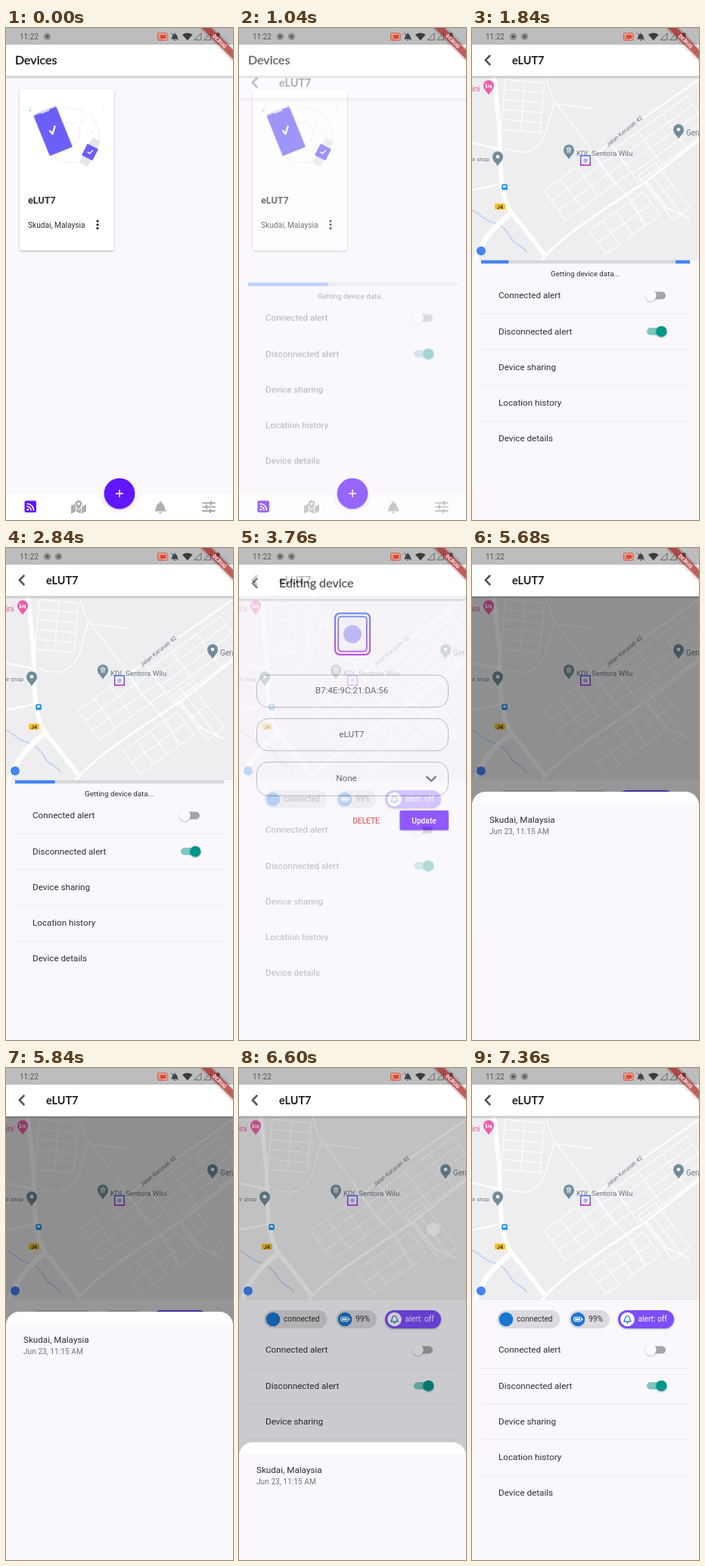
These frames come from a looping animation (300 px wide and 650 px high, 7400 ms). An HTML page:

```html
<!DOCTYPE html>
<html lang="en">
<head>
<meta charset="utf-8">
<style>
html, body { margin: 0; width: 100%; height: 100%; overflow: hidden; background: #faf8fd; }
svg { display: block; width: 300px; height: 650px; }
text { font: 11.68px Roboto, sans-serif; fill: #302f32; }
.s { font-size: 10.2px; }
.title { font: 500 16px Lato, sans-serif; fill: #1d1c20; stroke: #1d1c20; stroke-width: .3px; }
.name { font-size: 14.4px; font-weight: 700; stroke-width: 0; }
.mid { text-anchor: middle; }
.map text { fill: #66747e; stroke: #f2f1f4; stroke-width: 1.6px; paint-order: stroke; }
.road { fill: none; stroke: #fdfdfd; stroke-linejoin: round; }
.line { fill: none; stroke-linecap: round; stroke-linejoin: round; }
</style>
</head>
<body>
<svg id="stage" viewBox="0 0 300 650"></svg>
<script>
const LOOP = 7400, INK = '#6217ff', PAPER = '#faf8fd';
const NAME = 'eLUT7', PLACE = 'Skudai, Malaysia';

// Markup helpers
const text = (x, y, s, cls = '', more = '') => `<text x="${x}" y="${y}" class="${cls}" ${more}>${s}</text>`;
const rect = (x, y, w, h, fill, r = 0, more = '') =>
  `<rect x="${x}" y="${y}" width="${w}" height="${h}" rx="${r}" fill="${fill}" ${more}/>`;
const dot = (x, y, r, fill, more = '') => `<circle cx="${x}" cy="${y}" r="${r}" fill="${fill}" ${more}/>`;
const line = (d, color, w = 1, more = '') =>
  `<path class="line" d="${d}" stroke="${color}" stroke-width="${w}" ${more}/>`;
const fill = (d, color, more = '') => `<path d="${d}" fill="${color}" ${more}/>`;
const at = (x, y, body, more = '') => `<g transform="translate(${x} ${y}) ${more}">${body}</g>`;
const group = (id, body, more = '') => `<g id="${id}" ${more}>${body}</g>`;

const bell = (x, y, k, color) => at(x, y,
  fill('M-8 5.5C-5 3-6-6 0-6S5 3 8 5.5ZM-2 6.5H2A2 2 0 0 1-2 6.5ZM-1-8H1V-5H-1Z', color), `scale(${k})`);

const bar = (title, cls, x) => rect(0, 0, 300, 63.5, '#fff') + rect(0, 63.5, 300, 4, 'url(#shade)') +
  (x > 20 ? line('M23.5 36.8L17.8 42.5L23.5 48.2', '#5a595c', 2.7) : '') + text(x, 48, title, 'title ' + cls);

const illustration =
  `<g fill="none" stroke="#e6e4f3" stroke-width=".8">
    <circle cx="83" cy="139" r="15"/><path d="M78 107A36 36 0 0 1 122 151M117 158A36 36 0 0 1 62 170"/>
    <circle cx="101" cy="124" r="1.3"/><circle cx="60" cy="171" r="1.3"/></g>` +
  dot(32, 109, 1.4, '#8fe0d0') + dot(34, 105, .8, '#8fe0d0') +
  dot(129, 104, 1, '#cfe9e6') + dot(114, 138, 1, '#cfe9e6') +
  at(62, 136, rect(-17, -30, 34, 60, '#d9d7ee', 3) + rect(-16, -28, 32, 57, '#6c5ff8', 1.5) +
    rect(-6, -29.5, 12, 3, '#d9d7ee', 1), 'rotate(-22)') +
  line('M58 136L61.5 140L64.5 130', '#fff', 2.4) +
  at(111, 164, rect(-6, -19, 12, 38, '#e6e6ea', 2) + rect(-8, -8.5, 16, 17, '#6c5ff8', 1), 'rotate(27)') +
  line('M108 164L110.3 166L114.5 162', '#fff', 1.5);

const navIcons =
  rect(24.5, 624.5, 15.5, 15.5, INK, 2) +
  line('M28 628.5A8.5 8.5 0 0 1 36.5 637M28 632A5 5 0 0 1 33 637', '#fff', 1.6) + dot(28.8, 636.2, 1.4, '#fff') +
  fill('M86 631L92 628V639L86 641.5ZM93 629L99 633V641.5L93 639ZM100 633L106 629V638.5L100 641.5Z', '#b0afb2') +
  fill('M96 637C92 632 91 630 91 628.5A5 5 0 0 1 101 628.5C101 630 100 632 96 637Z', '#b0afb2', `stroke="#fff"`) +
  dot(96, 628.5, 1.7, '#fff') + bell(204, 633, 1, '#b0afb2') +
  line('M260 627.5H276M260 632.7H276M260 638H276', '#a9a8ab', 1.8) +
  line('M271 625.5V629.5M265 630.7V634.7M270 636V640', '#a9a8ab', 2.2);

const devices = rect(0, 0, 300, 650, PAPER) + bar('Devices', '', 12) +
  rect(18, 81, 125, 213, '#fff', 2.5, 'filter="url(#soft)"') + illustration +
  text(29, 232, NAME, '', 'style="font-size:12.6px;font-weight:700"') + text(29, 263.5, PLACE, 's') +
  [255, 259.8, 264.6].map(y => dot(121, y, 1.6, '#222')).join('') +
  fill('M0 614.5H112C122 614.5 123 616 125 622A26 26 0 0 0 175 622C177 616 178 614.5 188 614.5H300V650H0Z', '#fff', 'filter="url(#soft)"') +
  navIcons + dot(150, 615, 20.3, INK, 'filter="url(#soft)"') + line('M145.5 615H154.5M150 610.5V619.5', '#fff', 1.5);

// Street blocks: rows of lines with cross streets, turned as one
const block = (x, y, turn, w, h, nx, ny) => {
  let d = '';
  for (let i = 0; i <= ny; i++) d += `M0 ${h * i / ny}H${w}`;
  for (let i = 0; i <= nx; i++) d += `M${w * i / nx} 0V${h}`;
  return `<path class="road" stroke-width="1.3" d="${d}" transform="translate(${x} ${y}) rotate(${turn})"/>`;
};
const road = (d, w) => `<path class="road" d="${d}" stroke-width="${w}"/>`;
const pin = (x, y, color) => at(x, y,
  fill('M0 10.5C-2 6-7 3.5-7-2A7 7 0 0 1 7-2C7 3.5 2 6 0 10.5Z', color));

const streets = rect(0, 64, 300, 243, '#eeedef') +
  line('M0 241C12 246 16 254 28 257S46 268 52 278S66 286 72 296', '#bcd3f2', 1.6) +
  block(44, 68, 5, 52, 66, 2, 5) + block(95, 215, -36, 108, 48, 4, 3) + block(155, 268, -36, 88, 38, 4, 2) +
  block(188, 160, -36, 118, 54, 3, 4) + block(242, 178, 52, 75, 28, 2, 2) +
  road('M97 64L106 92L150 150L178 190L214 232L228 262', 1.5) + road('M45 160C70 168 84 166 97 140L108 100L160 106', 1.5) +
  road('M150 176L228 118L300 68', 2.4) + road('M92 307C112 282 140 262 230 203L300 148', 3.4) +
  road('M230 203L258 238L288 252', 2.4) + road('M29 64L36 130L38 190C40 225 48 242 62 256L96 300', 6) +
  road('M50 246C30 262 14 278 4 307', 7) + road('M0 152L38 160M0 214L40 206', 2.4);

const labels =
  pin(22, 78, '#ec5fa8') + line('M18.5 73.5V79.5M18.5 78H25.5V79.5M21 76H25.5V78', '#fff', 1.1) +
  text(0, 83.5, 'ini', 's', 'style="fill:#d8569c"') +
  [[34, 172], [128, 163], [273, 136]].map(([x, y]) => pin(x, y, '#718d9a')).join('') +
  dot(34, 170, 2.3, '#fff') + dot(273, 134, 2.3, '#fff') +
  line('M125 159.5L128 157L131 159.5ZM125.5 164H130.5M126 160.5V163M128 160.5V163M130 160.5V163', '#fff', .9) +
  text(0, 175.5, 'ir shop', '', 'style="font-size:7.6px"') +
  text(138, 169, 'KDL Sentora Wilu', '', 'style="font-size:9.7px"') +
  text(283, 141.5, 'Gera', '', 'style="font-size:10px"') +
  at(180, 157, text(0, 0, 'Jalan Kerunati 42', '', 'style="font-size:7.6px"'), 'rotate(-39)') +
  rect(39.3, 206.3, 7.6, 7.6, '#1e96ee', 1.5) + rect(41.2, 208, 3.8, 2.8, '#fff', .5) +
  rect(30, 232, 14, 8, '#fbc02d', 2) + text(37, 238.6, 'J4', 'mid', 'style="font-size:7px;font-weight:700;stroke:none;fill:#333"') +
  rect(143.7, 168.7, 12.6, 12.6, '#f4f2fb', 0, 'stroke="url(#tag)" stroke-width="1.4"') + dot(150, 175, 2.8, '#a9b2fa') +
  dot(12, 294.5, 6, '#4285f4');

const ROW = 47.3;
const row = (s, i) => text(35, 357.2 + ROW * i, s) +
  (i < 4 ? rect(12, 377 + ROW * i, 276, .8, '#e9e7ec') : '');
const rows = ['Connected alert', 'Disconnected alert', 'Device sharing', 'Location history', 'Device details'].map(row).join('') +
  rect(235, 348.6, 21, 9.8, '#a7a6a9', 4.9) + dot(236.5, 353.5, 7.2, '#fcfbfd', 'filter="url(#soft)"') +
  rect(231, 396, 21, 9.8, '#7cc8c1', 4.9) + dot(250.3, 400.9, 7.2, '#009688', 'filter="url(#soft)"');

const chips =
  rect(33, 320, 83.5, 24, '#dcdade', 12) + dot(45, 332, 9.3, '#1976d2') + text(59, 335.2, 'connected', 's') +
  rect(128, 320, 54, 24, '#dcdade', 12) + dot(140, 332, 9.3, '#1976d2') + text(154, 335.2, '99%', 's') +
  rect(134.5, 329.2, 10, 5.6, 'none', 1, 'stroke="#fff"') + rect(136, 330.6, 7, 2.8, '#fff') + rect(145, 330.7, 1.3, 2.6, '#fff') +
  rect(193, 320, 74, 24, '#7c4dff', 12, 'filter="url(#soft)"') + dot(205.5, 332, 9.3, '#fff') +
  line('M200.8 334.8C203 332.5 201.5 327.5 205.5 327.5S208 332.5 210.2 334.8ZM204.5 336.6H206.5', '#1976d2', 1.2) +
  text(219.5, 335.2, 'alert: off', 's', 'style="fill:#fff"');

const loading = rect(12, 306.8, 276, 4.4, '#d8d6db') + rect(12, 306.8, 0, 4.4, '#4285f4', 0, 'id="seg1"') +
  rect(12, 306.8, 0, 4.4, '#4285f4', 0, 'id="seg2"') +
  text(149.7, 328, 'Getting device data...', 'mid', 'style="font-size:9.75px"');

const detail = rect(0, 0, 300, 650, PAPER) + group('streets', streets) + group('labels', labels, 'class="map"') +
  group('rows', rows) + group('loading', loading) + group('chips', chips) +
  rect(0, 64, 300, 586, '#000', 0, 'id="dim"') +
  group('sheet', fill('M0 328V18A18 18 0 0 1 18 0H282A18 18 0 0 1 300 18V328Z', '#fff') + rect(0, 15, 300, 320, PAPER) +
    text(23, 41, PLACE) + text(23, 56, 'Jun 23, 11:15 AM', 's', 'style="fill:#757478"')) +
  bar(NAME, 'name', 53);

const field = (y, h, s, x) => rect(23.5, y, 253, h, 'none', 15, 'stroke="#9a999c" stroke-width=".9"') +
  text(x, y + h / 2 + 3, s, 'mid');
const edit = rect(0, 0, 300, 650, PAPER) + bar('Editing device', '', 53) +
  rect(127, 82.5, 46, 54.5, 'none', 6, 'stroke="url(#tag)" stroke-width="2.2"') +
  rect(131.2, 86.7, 37.6, 46, '#f5f3fd', 4, 'stroke="url(#tag)" stroke-width="1.8"') + dot(150, 110, 12, '#a9a4f6') +
  field(164, 42.5, 'B7:4E:9C:21:DA:56', 149) + field(221.5, 42.5, NAME, 149) + field(279, 44.5, 'None', 142) +
  line('M248.3 298.6L254 304L259.7 298.6', '#59585b', 2.5) +
  text(168, 359.8, 'DELETE', 's mid', 'style="fill:#d32f2f;font-weight:500"') +
  rect(212.5, 343, 64.5, 26, INK, 2, 'filter="url(#soft)"') +
  text(244.5, 359.8, 'Update', 's mid', 'style="fill:#fff;font-weight:500"');

const ring = x => dot(x, 11.2, 4, 'none', 'stroke="#5e5d60" stroke-width=".9"') + dot(x, 11.2, 2.5, '#5e5d60');
const status = rect(0, 0, 300, 22, '#bdbcbe') + text(18, 15, '11:22', '', 'style="font-size:10px;fill:#555457"') +
  group('ring1', ring(54.5)) + group('ring2', ring(69.5)) +
  rect(200.5, 6.8, 12.6, 9.4, '#e3aca2', 1, 'stroke="#d5513b" stroke-width=".9"') + rect(204, 9, 7.2, 5, '#e2492f') +
  line('M201 10.5A6 6 0 0 1 207 16.2M201 13.3A3 3 0 0 1 204 16.2', '#d5513b', .9) +
  bell(223, 11.4, .62, '#454447') + line('M218.5 6.8L227.8 16.2', '#454447', 1) +
  fill('M233 8.8Q239.8 4 246.6 8.8L239.8 16.6Z', '#3b3a3d') +
  line('M249.5 15.8H258V7.2ZM262 15.8H270.5V7.2Z', '#5b5a5d', .9) + rect(277, 6.5, 5.5, 9.5, '#4a494c', 1);
const banner = at(300, 0, rect(-45, 20.4, 90, 8.8, '#a8201f', 0, 'opacity=".72" filter="url(#cast)"') +
  text(0, 27.3, 'DEBUG', 'mid', 'style="font-size:7.2px;font-weight:900;fill:#f4e6e6"'), 'rotate(45)');

const stage = document.getElementById('stage');
stage.innerHTML = `<defs>
  <linearGradient id="shade" x2="0" y2="1"><stop stop-color="#000" stop-opacity=".22"/><stop offset="1" stop-color="#000" stop-opacity="0"/></linearGradient>
  <linearGradient id="tag" x2="0" y2="1"><stop stop-color="#3f62f5"/><stop offset="1" stop-color="#a51be0"/></linearGradient>
  <filter id="soft" x="-30%" y="-30%" width="160%" height="170%"><feDropShadow dx="0" dy="1" stdDeviation="1.1" flood-opacity=".3"/></filter>
  <filter id="cast" x="-10%" y="-80%" width="120%" height="260%"><feDropShadow dx="0" dy="0" stdDeviation="2" flood-opacity=".6"/></filter>
  </defs>` + devices + group('detail', detail) + group('edit', edit) + status + banner +
  '<ellipse id="bulge" cx="249" cy="650" rx="44" fill="#dcdbde"/>' +
  dot(0, 0, 8.3, '#fff', 'id="touch" fill-opacity=".25" stroke="#d5d3d9" stroke-width=".9"');

// Motion
const el = Object.fromEntries([...stage.querySelectorAll('[id]')].map(n => [n.id, n]));
const set = (id, attrs) => { for (const k in attrs) el[id].setAttribute(k, attrs[k]); };
const show = (id, on) => set(id, { opacity: on ? 1 : 0 });
const span = (t, a, b) => Math.min(1, Math.max(0, (t - a) / (b - a)));
const bezier = (x1, y1, x2, y2) => x => {
  if (x <= 0 || x >= 1) return Math.min(1, Math.max(0, x));
  const f = (s, p, q) => 3 * (1 - s) * (1 - s) * s * p + 3 * (1 - s) * s * s * q + s ** 3;
  let lo = 0, hi = 1;
  for (let i = 0; i < 22; i++) {
    const m = (lo + hi) / 2;
    if (f(m, x1, x2) < x) lo = m; else hi = m;
  }
  return f(lo, y1, y2);
};
const rise = bezier(.4, 0, .2, 1), fade = bezier(.42, 0, 1, 1);
const head1 = bezier(.2, 0, .8, 1), tail1 = bezier(.4, 0, 1, 1);
const head2 = bezier(0, 0, .65, 1), tail2 = bezier(.1, 0, .45, 1);

const page = (id, v) => set(id, {
  opacity: fade(v), visibility: v > 0 ? 'visible' : 'hidden',
  transform: `translate(0 ${162.5 * (1 - rise(v))})`
});
const segment = (id, tail, head) => set(id, { x: 12 + 276 * tail, width: 276 * Math.max(0, head - tail) });
const track = (keys, t) => {
  const i = keys.findIndex(k => k[0] > t);
  if (i < 1) return 0;
  const [a, b] = [keys[i - 1], keys[i]];
  return a[1] + (b[1] - a[1]) * span(t, a[0], b[0]);
};

// start, end, x, y from, y to, travel time
const TOUCHES = [
  [680, 840, 92, 160, 160, 1], [3340, 3480, 116, 558, 558, 1], [4840, 4990, 255, 640, 580, 80],
  [5240, 5340, 116, 516, 516, 1], [6380, 6640, 257, 213, 213, 1]
];

function draw(t) {
  page('detail', span(t, 880, 1180));
  page('edit', span(t, 3520, 3820) - span(t, 4960, 5200));

  set('streets', { opacity: span(t, 1280, 1480) });
  set('labels', { opacity: span(t, 1520, 1620) });

  const ready = t >= 2960;
  show('loading', !ready);
  show('chips', ready);
  set('rows', { transform: `translate(0 ${ready ? 19 : 0})` });
  const c = (1050 + (t - 1840) * .932 + 1800) % 1800;
  segment('seg1', tail1(span(c, 333, 1083)), head1(span(c, 0, 750)));
  segment('seg2', tail2(span(c, 1267, 1800)), head2(span(c, 1000, 1567)));

  const v = span(t, 5335, 5585) - span(t, 6456, 6656);
  const up = 1 - (1 - v) ** 2;
  set('sheet', { transform: `translate(0 ${650 - 328 * up})` });
  set('dim', { opacity: .4 * up });

  const rings = t >= 5400 && t < 7000 ? 0 : t < 1000 ? 1 : 2;
  show('ring1', rings > 0);
  show('ring2', rings > 1);

  set('bulge', { ry: track([[4840, 0], [4920, 7.5], [4980, 9], [5080, 0]], t) });
  const tap = TOUCHES.find(k => t >= k[0] && t < k[1]);
  show('touch', tap);
  if (tap) {
    const [from, , x, y0, y1, time] = tap;
    set('touch', { cx: x, cy: y0 + (y1 - y0) * span(t, from, from + time) });
  }
}

const start = performance.now();
function tick() {
  draw((performance.now() - start) % LOOP);
  requestAnimationFrame(tick);
}
tick();
</script>
</body>
</html>
```
